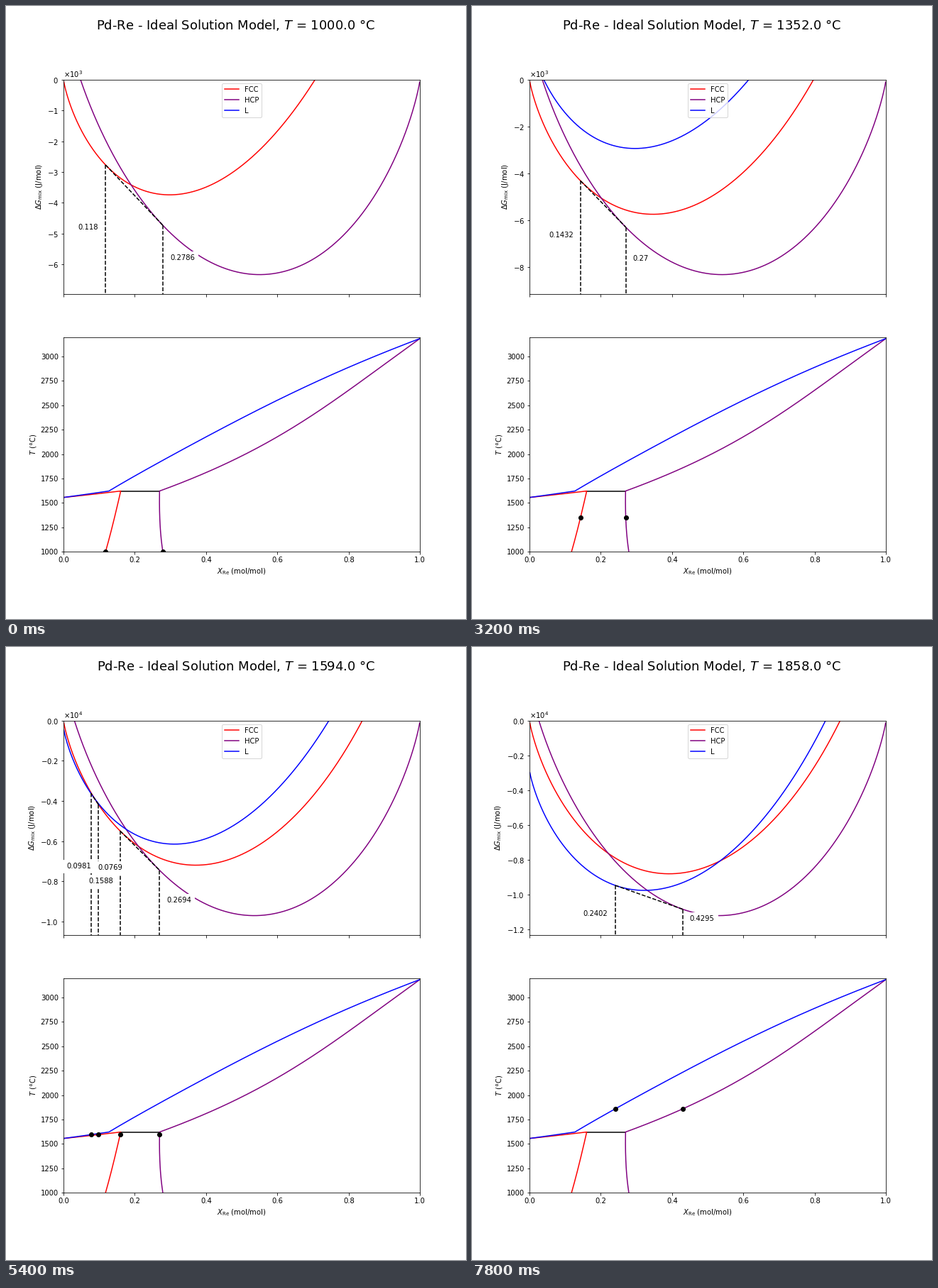
A matplotlib script that plays this animation: 648 by 864 pixels, repeating every 8000 ms.

```python
import numpy as np
import matplotlib.pyplot as plt
from matplotlib.animation import FuncAnimation

R = 8.314462
KELVIN = 273.15
T_START, T_STEP, FRAMES = 1000.0, 22.0, 40
MELT_PD, MELT_RE = 1828.0, 3458.0
COLORS = {"FCC": "red", "HCP": "purple", "L": "blue"}
X = np.linspace(0.001, 0.999, 999)
MIXING = X * np.log(X) + (1 - X) * np.log(1 - X)


def series(T, a, b, c, d, e, f):
    return a + b * T + c * T * np.log(T) + d * T**2 + e * T**3 + f / T


def fusion_pd(T):
    if T < MELT_PD:
        return series(T, 22488.716, -166.578311, 24.4630031,
                      -20.09078e-3, 2.23956e-6, -741209)
    return series(T, 54787.381, -118.685244, 13.0367086,
                  -2.091396e-3, 6.2811e-8, -18683526)


def fusion_re(T):
    if T < 2000:
        return 23820.883 - 6.34538 * T
    if T < 2400:
        return series(T, 584618.663, -2722.505881, 347.764898,
                      -91.64382e-3, 4.210375e-6, -164477257)
    return series(T, 639725.404, -2989.949204, 382.134898,
                  -101.24762e-3, 4.717495e-6, -181176187)


def pure(phase, T):
    """Energies of pure Pd and Re against their stable solids."""
    if phase == "FCC":
        return 0.0, 11000 - 1.5 * T
    if phase == "HCP":
        return 2000 + 0.1 * T, 0.0
    return fusion_pd(T), fusion_re(T)


def gibbs(phase, T, x=X, mixing=MIXING):
    pd, re = pure(phase, T)
    return (1 - x) * pd + x * re + R * T * mixing


def gibbs_at(phase, T, x):
    return gibbs(phase, T, x, x * np.log(x) + (1 - x) * np.log(1 - x))


def tie(p, q, T):
    """Compositions where phases p and q share a common tangent."""
    (pd_p, re_p), (pd_q, re_q) = pure(p, T), pure(q, T)
    a = np.exp((re_q - re_p) / (R * T))
    b = np.exp((pd_q - pd_p) / (R * T))
    xq = (b - 1) / (b - a)
    return a * xq, xq


def peritectic():
    lo, hi = MELT_PD + 1, MELT_PD + 150
    for _ in range(60):
        mid = (lo + hi) / 2
        if tie("FCC", "L", mid)[0] < tie("FCC", "HCP", mid)[0]:
            lo = mid
        else:
            hi = mid
    return lo


T_PER = peritectic()


def stable_pairs(T):
    if T > T_PER:
        return [("L", "HCP")]
    pairs = [("FCC", "HCP")]
    if T > MELT_PD:
        pairs.insert(0, ("FCC", "L"))
    return pairs


fig, (top, low) = plt.subplots(2, 1, sharex=True, figsize=(9, 12), dpi=72)
title = fig.suptitle("", fontsize=18)

curves = {p: top.plot(X, 0 * X, color=c, label=p)[0] for p, c in COLORS.items()}
top.set_xlim(0, 1)
top.set_ylabel(r"$\Delta G_{\mathrm{mix}}$ (J/mol)")
top.ticklabel_format(axis="y", style="sci", scilimits=(0, 0), useMathText=True)
top.legend(loc="upper center")


def boundary(p, q, start, stop):
    temps = np.linspace(start, stop, 150)
    xp, xq = np.array([tie(p, q, T) for T in temps]).T
    return temps - KELVIN, xp, xq


def draw_diagram():
    t1, fcc_solvus, hcp_solvus = boundary("FCC", "HCP", T_START + KELVIN, T_PER)
    t2, fcc_solidus, liq_fcc = boundary("FCC", "L", MELT_PD, T_PER)
    t3, liq_hcp, hcp_solidus = boundary("L", "HCP", T_PER, MELT_RE)
    join = np.concatenate
    low.plot([fcc_solvus[-1], hcp_solvus[-1]], [t1[-1]] * 2, color="black")
    low.plot(join([fcc_solvus, fcc_solidus[::-1]]), join([t1, t2[::-1]]),
             color=COLORS["FCC"])
    low.plot(join([hcp_solvus, hcp_solidus]), join([t1, t3]),
             color=COLORS["HCP"])
    low.plot(join([liq_fcc, liq_hcp]), join([t2, t3]), color=COLORS["L"])
    low.set_ylim(1000, 3200)
    low.set_xlabel(r"$X_{\mathrm{Re}}$ (mol/mol)")
    low.set_ylabel(r"$T$ (°C)")


draw_diagram()
extras = []


def draw_tie(pair, T, floor):
    xs = tie(*pair, T)
    gs = [gibbs_at(p, T, x) for p, x in zip(pair, xs)]
    extras.extend(top.plot(xs, gs, "k--"))
    for phase, x, g, side in zip(pair, xs, gs, (-1, 1)):
        extras.extend(top.plot([x, x], [g, floor], "k--"))
        va = "baseline"
        if "L" in pair:
            va = "top" if phase == "L" else "bottom"
        extras.append(top.text(x + 0.02 * side, (g + floor) / 2,
                               str(round(float(x), 4)), va=va,
                               ha="right" if side < 0 else "left",
                               backgroundcolor="white"))
    extras.extend(low.plot(xs, [T - KELVIN] * 2, "ko"))


def update(i):
    while extras:
        extras.pop().remove()
    celsius = T_START + T_STEP * i
    T = celsius + KELVIN
    title.set_text(f"Pd-Re - Ideal Solution Model, $T$ = {celsius} °C")
    lowest = 0
    for phase, line in curves.items():
        g = gibbs(phase, T)
        line.set_ydata(g)
        lowest = min(lowest, g.min())
    floor = 1.1 * lowest
    top.set_ylim(floor, 0)
    for pair in stable_pairs(T):
        draw_tie(pair, T, floor)
    return []


anim = FuncAnimation(fig, update, frames=FRAMES, interval=200,
                     init_func=lambda: [], repeat=True, repeat_delay=0)
plt.show()
```
